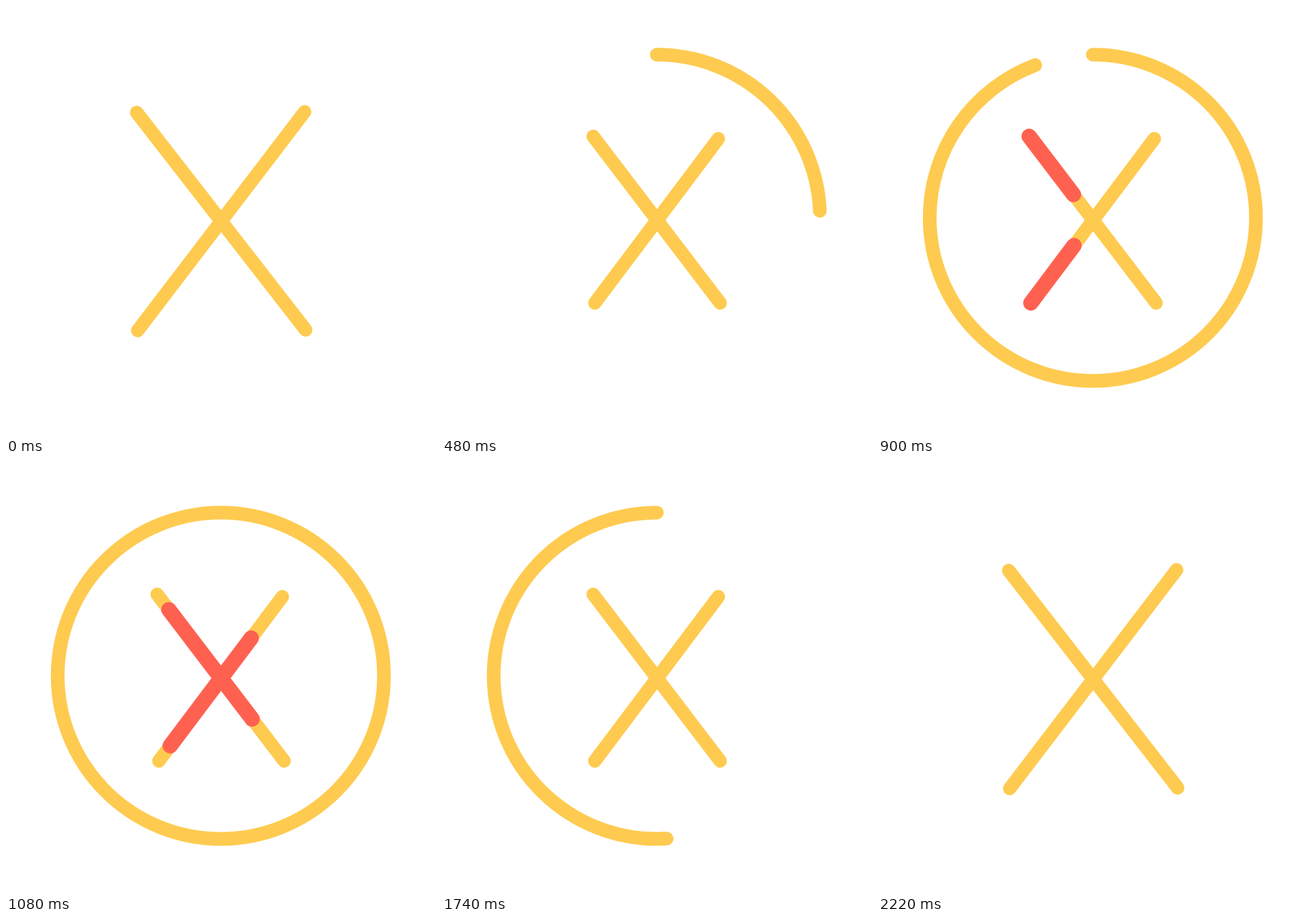
An HTML page with a canvas that plays this animation: 640 by 640 pixels, repeating every 2600 ms.

```html
<!DOCTYPE html>
<html lang="en">
<head>
<meta charset="utf-8">
<title>Cross and ring</title>
<style>
  html, body { margin: 0; width: 100%; height: 100%; overflow: hidden; background: #fff; }
  canvas { display: block; width: 640px; height: 640px; }
</style>
</head>
<body>
<canvas id="stage" width="640" height="640"></canvas>
<script>
const ctx = document.getElementById('stage').getContext('2d');
const LOOP = 2600, TICK = 20;
const YELLOW = '#fecb50', RED = '#ff6151';
const RING = { x: 319.75, y: 315.2, r: 242.8 };

// Each arm as x1, y1, x2, y2; a highlight runs from the first point to the second.
const ARMS = [
  { wide: [194.5, 158.5, 446, 482], tight: [225, 194, 414, 442] },
  { wide: [196, 483, 444.5, 157.5], tight: [227.5, 442, 411.3, 197.5] }
];

// Start and end time of every move, in ms.
const MOVES = {
  shrink: [80, 440],
  ringHead: [144, 1077],
  ringTail: [1277, 2212],
  redHead: [541, 1391],
  redTail: [907, 1643],
  grow: [1830, 2215]
};

// Equals cubic-bezier(.5, 0, .5, 1).
function ease(x) {
  if (x <= 0) return 0;
  if (x >= 1) return 1;
  let lo = 0, hi = 1;
  for (let i = 0; i < 24; i++) {
    const s = (lo + hi) / 2;
    if (1.5 * s - 1.5 * s * s + s * s * s < x) lo = s; else hi = s;
  }
  return lo * lo * (3 - 2 * lo);
}

function progress(name, t) {
  const [start, end] = MOVES[name];
  return ease((t - start) / (end - start));
}

const mix = (a, b, p) => a + (b - a) * p;

function stroke(color, width, trace) {
  ctx.strokeStyle = color;
  ctx.lineWidth = width;
  ctx.beginPath();
  trace();
  ctx.stroke();
}

function segment([x1, y1, x2, y2], from, to, color, width) {
  stroke(color, width, () => {
    ctx.moveTo(mix(x1, x2, from), mix(y1, y2, from));
    ctx.lineTo(mix(x1, x2, to), mix(y1, y2, to));
  });
}

function draw(t) {
  ctx.clearRect(0, 0, 640, 640);
  ctx.lineCap = 'round';

  const head = progress('ringHead', t), tail = progress('ringTail', t);
  if (head > tail) {
    const angle = p => (p * 2 - 0.5) * Math.PI;
    stroke(YELLOW, 20.4, () => ctx.arc(RING.x, RING.y, RING.r, angle(tail), angle(head)));
  }

  const tight = progress('shrink', t) - progress('grow', t);
  const arms = ARMS.map(arm => arm.wide.map((v, i) => mix(v, arm.tight[i], tight)));
  arms.forEach(arm => segment(arm, 0, 1, YELLOW, 20));

  const redHead = progress('redHead', t), redTail = progress('redTail', t);
  if (redHead > redTail) {
    arms.forEach(arm => segment(arm, redTail, redHead, RED, 22.8));
  }
}

const begin = performance.now();
function frame() {
  const t = (performance.now() - begin) % LOOP;
  draw(Math.floor(t / TICK) * TICK);
  requestAnimationFrame(frame);
}
frame();
</script>
</body>
</html>
```
